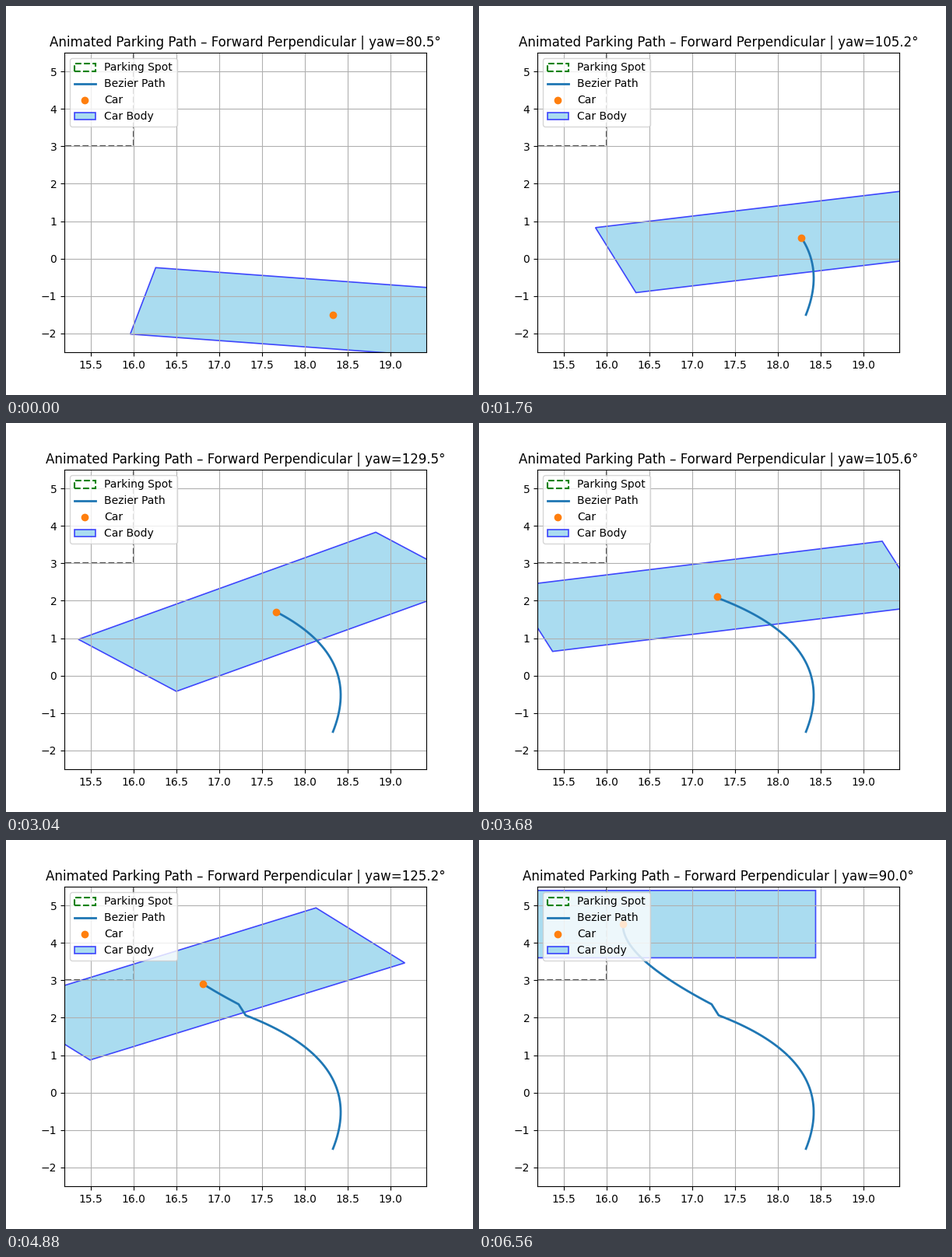
Recreate the animation shown at these times as a matplotlib script. Size 600 px wide and 500 px high, loop 6.64 s.

```python
import numpy as np
import matplotlib.pyplot as plt
from matplotlib.animation import FuncAnimation
from matplotlib.patches import Polygon, Rectangle

CAR_LENGTH, CAR_WIDTH = 4.5, 1.8


def bezier(start, first_leg, second_leg, count):
    """Quadratic curve given by its start and the two legs of its control polygon."""
    t = np.linspace(0, 1, count)[:, None]
    a, b = np.array(first_leg), np.array(second_leg)
    return np.array(start) + 2 * t * a + t**2 * (b - a)


def car_corners(center, yaw):
    along = np.array([np.cos(yaw), np.sin(yaw)]) * CAR_WIDTH / 2
    across = np.array([-np.sin(yaw), np.cos(yaw)]) * CAR_LENGTH / 2
    return center + np.array([along + across, along - across,
                              -along - across, -along + across])


# Two curves joined by a short straight piece
turn_in = bezier((18.327, -1.5), (0.407, 2.32), (-1.4262, 1.2435), 45)
settle = bezier((17.225, 2.36), (-1.0549, 1.2641), (0.0199, 0.8759), 28)
bridge = np.linspace(turn_in[-1], settle[0], 12)[1:-1]
path = np.vstack([turn_in, bridge, settle])

steps = np.diff(path, axis=0)
yaws = np.arctan2(steps[:, 1], steps[:, 0])
yaws = np.insert(yaws, 0, yaws[0])

fig, ax = plt.subplots(figsize=(6, 5), dpi=100)
ax.set_xlim(path[:, 0].min() - 1, path[:, 0].max() + 1)
ax.set_ylim(path[:, 1].min() - 1, path[:, 1].max() + 1)
ax.grid(True)

ax.add_patch(Rectangle((11, 3), 5, 3, fill=False, edgecolor="black",
                       linestyle="--", linewidth=1.5, alpha=0.7))
spot = Rectangle((11, 6), 5, 3, fill=False, edgecolor="green",
                 linestyle="--", linewidth=1.5, label="Parking Spot")
ax.add_patch(spot)
trail, = ax.plot([], [], color="tab:blue", linewidth=2, label="Bezier Path")
dot, = ax.plot([], [], "o", color="tab:orange", label="Car")
body = Polygon(car_corners(path[0], yaws[0]), closed=True, facecolor="skyblue",
               edgecolor="blue", linewidth=1.2, alpha=0.7, label="Car Body")
ax.add_patch(body)
ax.legend(handles=[spot, trail, dot, body], loc="upper left")
title = ax.set_title("")


def update(i):
    trail.set_data(path[:i + 1, 0], path[:i + 1, 1])
    dot.set_data(path[i:i + 1, 0], path[i:i + 1, 1])
    body.set_xy(car_corners(path[i], yaws[i]))
    title.set_text("Animated Parking Path – Forward Perpendicular | "
                   f"yaw={np.degrees(yaws[i]):.1f}°")
    return trail, dot, body, title


anim = FuncAnimation(fig, update, frames=len(path), interval=80,
                     repeat=True, repeat_delay=0, blit=False)
plt.show()
```
